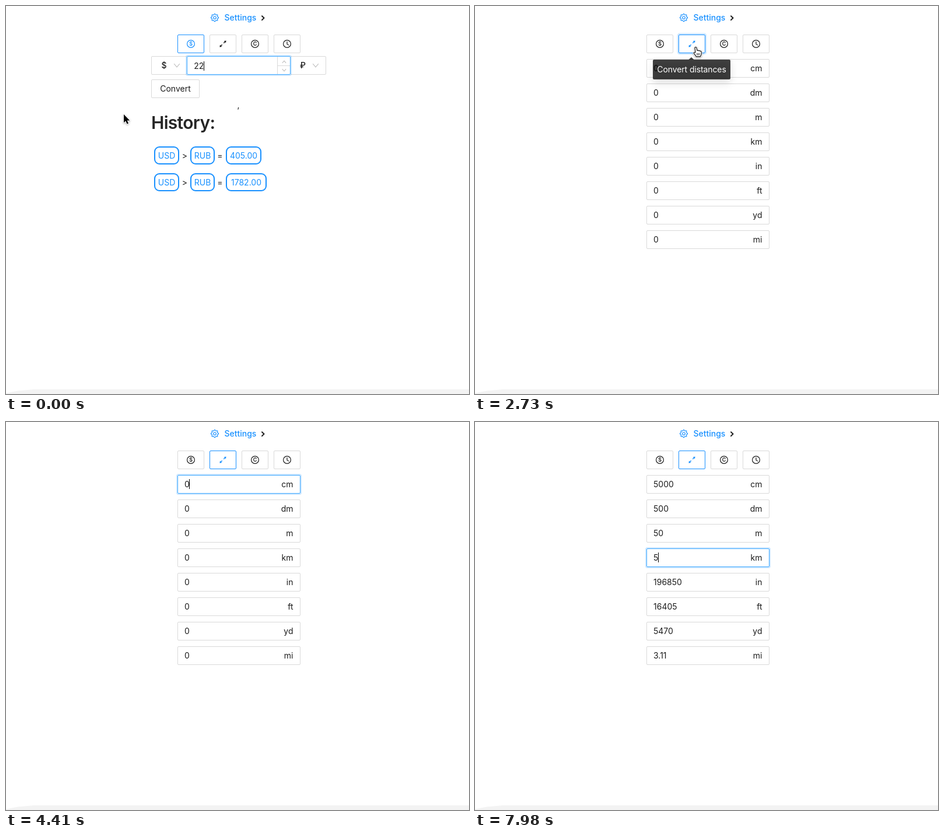
Write an HTML page with a canvas that moves like this. It is 794x666 px and loops after 8000 ms.

```html
<!DOCTYPE html>
<html lang="en">
<head>
<meta charset="utf-8">
<title>Unit converter</title>
<style>
html, body { margin: 0; width: 100%; height: 100%; overflow: hidden; background: #fff; }
canvas { display: block; }
</style>
</head>
<body>
<canvas id="stage" width="794" height="666"></canvas>
<script>
const ctx = document.getElementById('stage').getContext('2d');
const LOOP = 8000, STEP = 70;
const BLUE = '#1890ff', FOCUS = '#40a9ff', INK = '#1c1c1c', LINE = '#d9d9d9', FAINT = '#bfbfbf';

const SWITCH = 2590;          // the distance tab is clicked
const TIP_IN = 1930, TIP_OUT = 3345;
const FOCUS_CM = 4200, FOCUS_KM = 7070;
const HIDE = [[4340, 6160], [7630, LOOP]];   // pointer hides while typing
const TABS = [294, 349, 404, 459];
const UNITS = ['cm', 'dm', 'm', 'km', 'in', 'ft', 'yd', 'mi'];
const FROM_CM = [1, .1, .01, .001, .3937, .0328, .0109, 0];
const FROM_KM = [1000, 100, 10, 1, 39370, 3281, 1094, .6214];
// time, typed amount, factors
const KEYS = [
  [4340, 0, FROM_CM], [4760, 5, FROM_CM], [4970, 50, FROM_CM],
  [5320, 5, FROM_CM], [5880, 0, FROM_CM], [7630, 5, FROM_KM]
];
// time, x, y of the pointer
const PATH = [
  [0, 202, 186], [350, 214, 192], [840, 214, 192], [1120, 340, 173],
  [1400, 354, 150], [1750, 374, 88], [1890, 380, 78], [2100, 381, 76],
  [2380, 379, 71], [3150, 378, 72], [3360, 258, 131], [3570, 256, 130],
  [4130, 364, 103], [6230, 364, 103], [7000, 372, 232], [LOOP, 372, 232]
];

const clamp = v => Math.max(0, Math.min(1, v));
const lerp = (a, b, k) => a + (b - a) * k;

function text(s, x, y, { size = 14, weight = 400, color = INK, align = 'left', gap = 0 } = {}) {
  ctx.font = `${weight} ${size}px Inter, sans-serif`;
  ctx.letterSpacing = gap + 'px';
  ctx.textAlign = align;
  ctx.fillStyle = color;
  ctx.fillText(s, x, y);
  return ctx.measureText(s).width;
}

function stroke(color, width) {
  ctx.strokeStyle = color;
  ctx.lineWidth = width;
  ctx.stroke();
}

function line(points, color, width = 1, close = false) {
  ctx.beginPath();
  points.forEach(p => ctx.lineTo(p[0], p[1]));
  if (close) ctx.closePath();
  stroke(color, width);
}

function circle(x, y, r, color, width) {
  ctx.beginPath();
  ctx.arc(x, y, r, 0, Math.PI * 2);
  stroke(color, width);
}

function ring(x, y, w, h, spread, alpha) {
  ctx.beginPath();
  ctx.roundRect(x - spread / 2, y - spread / 2, w + spread, h + spread, 2 + spread / 2);
  stroke(`rgba(24,144,255,${alpha})`, spread);
}

function box(x, y, w, h, color = LINE, glow = 0) {
  if (glow > 0) ring(x, y, w, h, 2, .22 * glow);
  ctx.beginPath();
  ctx.roundRect(x + .5, y + .5, w - 1, h - 1, 1.5);
  stroke(color, 1);
}

function chevron(x, y, half, dy) {
  line([[x - half, y - dy], [x, y + dy], [x + half, y - dy]], FAINT, 1.1);
}

function caret(x, y, h) {
  ctx.fillStyle = '#000';
  ctx.fillRect(Math.floor(x), y, 1, h);
}

function gear(x, y) {
  const points = [];
  for (let i = 0; i < 32; i++) {
    const a = (i + .5) / 32 * Math.PI * 2;
    const r = i % 4 === 1 || i % 4 === 2 ? 5.1 : 6.5;
    points.push([x + r * Math.cos(a), y + r * Math.sin(a)]);
  }
  line(points, BLUE, 1.15, true);
  circle(x, y, 2.3, BLUE, 1.1);
}

function arrows(x, y, color) {
  ctx.fillStyle = color;
  for (const s of [1, -1]) {
    line([[x + s * 1.3, y - s * 1.3], [x + s * 4, y - s * 4]], color, 1.4);
    ctx.beginPath();
    ctx.moveTo(x + s * 5.6, y - s * 5.6);
    ctx.lineTo(x + s * 1.8, y - s * 5);
    ctx.lineTo(x + s * 5, y - s * 1.8);
    ctx.fill();
  }
}

function header() {
  gear(358, 20);
  text('Settings', 374.5, 25, { color: BLUE, weight: 450 });
  line([[438.4, 16.6], [442.4, 20.6], [438.4, 24.6]], INK, 2);
}

function tabs(active, hover, t) {
  TABS.forEach((x, i) => {
    const on = i === active, color = on || i === hover ? BLUE : INK, cx = x + 23, cy = 65;
    if (on && t >= SWITCH) {
      const age = t - SWITCH;
      ring(x, 49, 46, 32, 1 + 4 * clamp(age / 400), .22 * (1 - clamp(age / 1700)));
    }
    box(x, 49, 46, 32, on ? BLUE : LINE);
    if (i === 1) return arrows(cx, cy, color);
    circle(cx, cy, 6.4, color, 1.2);
    if (i === 0) text('$', cx, cy + 3.4, { size: 9.5, weight: 500, color, align: 'center' });
    if (i === 2) text('C', cx, cy + 3.3, { size: 9, weight: 600, color, align: 'center' });
    if (i === 3) line([[cx, cy - 4], [cx, cy + .5], [cx + 3, cy + 2.3]], color, 1.2);
  });
}

function pill(s, x, y, w) {
  ctx.beginPath();
  ctx.roundRect(x + 1, y + 1, w - 2, 29, 8);
  stroke(BLUE, 2);
  text(s, x + w / 2, y + 21, { color: BLUE, align: 'center' });
}

function currency(t) {
  box(249, 86, 62, 32);
  box(487, 86, 62, 32);
  text('$', 266.5, 107, { weight: 500 });
  text('₽', 504, 107, { weight: 500 });
  chevron(293, 102, 4.8, 2.8);
  chevron(531, 102, 4.8, 2.8);
  line([[465.5, 87], [465.5, 117]], LINE);
  line([[465, 102.5], [487, 102.5]], LINE);
  chevron(477, 96, 3.2, -1.8);
  chevron(477, 110, 3.2, 1.8);
  box(310, 86, 178, 32, FOCUS, 1);
  const w = text('22', 322.3, 108);
  if ((t + 40) % 1050 < 525) caret(322.3 + w, 95, 16);

  box(249, 126, 83, 32);
  text('Convert', 290.5, 147, { align: 'center' });
  text(',', 396.5, 174.5);
  text('History:', 249, 211, { size: 30, weight: 600, color: '#262626', gap: -.7 });
  [['405.00', 61], ['1782.00', 70]].forEach(([sum, w], i) => {
    const y = 241 + 46 * i;
    pill('USD', 254, y, 43);
    text('>', 306.5, y + 21, { align: 'center' });
    pill('RUB', 316, y, 42);
    text('=', 367, y + 21, { align: 'center' });
    pill(sum, 377, y, w);
  });
}

function distances(t) {
  const key = KEYS.filter(k => t >= k[0]).pop() || [0, 0, FROM_CM];
  const focused = t >= FOCUS_KM ? 3 : t >= FOCUS_CM ? 0 : -1;
  const since = t - (focused === 3 ? FOCUS_KM : FOCUS_CM);
  const lastInput = Math.max(key[0], focused === 3 ? FOCUS_KM : FOCUS_CM);
  UNITS.forEach((unit, i) => {
    const y = 91 + 42 * i, on = i === focused;
    box(294, y, 211, 32, on ? FOCUS : LINE, on ? clamp(since / 200) : 0);
    const w = text(String(+(key[1] * key[2][i]).toFixed(2)), 306, y + 21);
    text(unit, 492.5, y + 21, { align: 'right' });
    if (on && (t - lastInput) % 1050 < 525) caret(306 + w, y + 7, 17);
  });
}

function tooltip(t) {
  const show = t < TIP_OUT ? clamp((t - TIP_IN) / 100) : 1 - clamp((t - TIP_OUT) / 100);
  if (show <= 0) return;
  const scale = lerp(.8, 1, show);
  ctx.save();
  ctx.translate(371.5, 88);
  ctx.scale(scale, scale);
  ctx.globalAlpha = show;
  ctx.save();
  ctx.shadowColor = 'rgba(0,0,0,.16)';
  ctx.shadowBlur = 14;
  ctx.shadowOffsetY = 6;
  ctx.fillStyle = 'rgba(0,0,0,.75)';
  ctx.beginPath();
  ctx.roundRect(-66.5, 4, 133, 34, 2);
  ctx.fill();
  ctx.restore();
  ctx.fillStyle = 'rgba(0,0,0,.75)';
  ctx.beginPath();
  ctx.moveTo(-5, 4);
  ctx.lineTo(-.5, 0);
  ctx.lineTo(4, 4);
  ctx.fill();
  text('Convert distances', 0, 26, { color: '#fff', align: 'center', gap: -.1 });
  ctx.restore();
}

function pointerAt(t) {
  const i = Math.max(1, PATH.findIndex(p => p[0] > t));
  const [t0, x0, y0] = PATH[i - 1], [t1, x1, y1] = PATH[i];
  const k = (t - t0) / (t1 - t0);
  return [lerp(x0, x1, k), lerp(y0, y1, k)];
}

const ARROW = new Path2D('M0 0V14.2L3.2 11.2L5.6 16.6L8 15.6L5.7 10.4H10.2Z');
const HAND = new Path2D('M-1.6 0Q0 -2 1.4 0L2.4 5Q4 3.8 5 5.4Q6.6 4.4 7.4 6' +
  'Q9.4 5.4 9.6 7.4V11Q9 13.4 8 15.4H.6Q-.6 12.6 -3.4 9.4Q-3.6 7.2 -.6 8.4Z');
const BEAM = new Path2D('M-3.2 -6.5Q0 -6.5 0 -4.5Q0 -6.5 3.2 -6.5M0 -4.5V5' +
  'M-3.2 7Q0 7 0 5Q0 7 3.2 7M-2 3H2');

function pointer(x, y, kind) {
  ctx.save();
  ctx.translate(x, y);
  ctx.lineJoin = 'round';
  if (kind === 'beam') {
    ctx.strokeStyle = '#fff';
    ctx.lineWidth = 2.6;
    ctx.stroke(BEAM);
    ctx.strokeStyle = '#000';
    ctx.lineWidth = 1.2;
    ctx.stroke(BEAM);
  } else {
    const hand = kind === 'hand', path = hand ? HAND : ARROW;
    ctx.shadowColor = 'rgba(0,0,0,.35)';
    ctx.shadowBlur = 3;
    ctx.shadowOffsetY = 1;
    ctx.strokeStyle = '#fff';
    ctx.lineWidth = hand ? 3 : 2;
    ctx.stroke(path);
    ctx.shadowColor = 'transparent';
    ctx.fillStyle = hand ? '#fff' : '#000';
    ctx.fill(path);
    if (hand) {
      ctx.strokeStyle = '#000';
      ctx.lineWidth = 1.1;
      ctx.stroke(path);
      for (const fx of [2.2, 4.2, 6.2]) line([[fx, 9.5], [fx, 13]], '#000', .8);
    }
  }
  ctx.restore();
}

function footer() {
  ctx.fillStyle = '#f3f3f3';
  ctx.beginPath();
  [[0, 666], [0, 664.5], [20, 660.5], [48, 658], [794, 658], [794, 666]].forEach(p => ctx.lineTo(...p));
  ctx.fill();
}

function draw(t) {
  const [x, y] = pointerAt(t), onDistances = t >= SWITCH;
  const hover = y >= 49 && y < 81 ? TABS.findIndex(b => x >= b && x < b + 46) : -1;
  const onField = onDistances
    ? x >= 294 && x < 505 && y >= 91 && y < 417 && (y - 91) % 42 < 32
    : x >= 310 && x < 465 && y >= 86 && y < 118;

  ctx.fillStyle = '#fff';
  ctx.fillRect(0, 0, 794, 666);
  footer();
  header();
  tabs(onDistances ? 1 : 0, hover, t);
  (onDistances ? distances : currency)(t);
  tooltip(t);
  if (!HIDE.some(([a, b]) => t >= a && t < b))
    pointer(x, y, hover >= 0 ? 'hand' : onField ? 'beam' : 'arrow');
}

const start = performance.now();
function tick() {
  const t = (performance.now() - start) % LOOP;
  draw(Math.floor(t / STEP) * STEP);
  requestAnimationFrame(tick);
}
tick();
</script>
</body>
</html>
```
